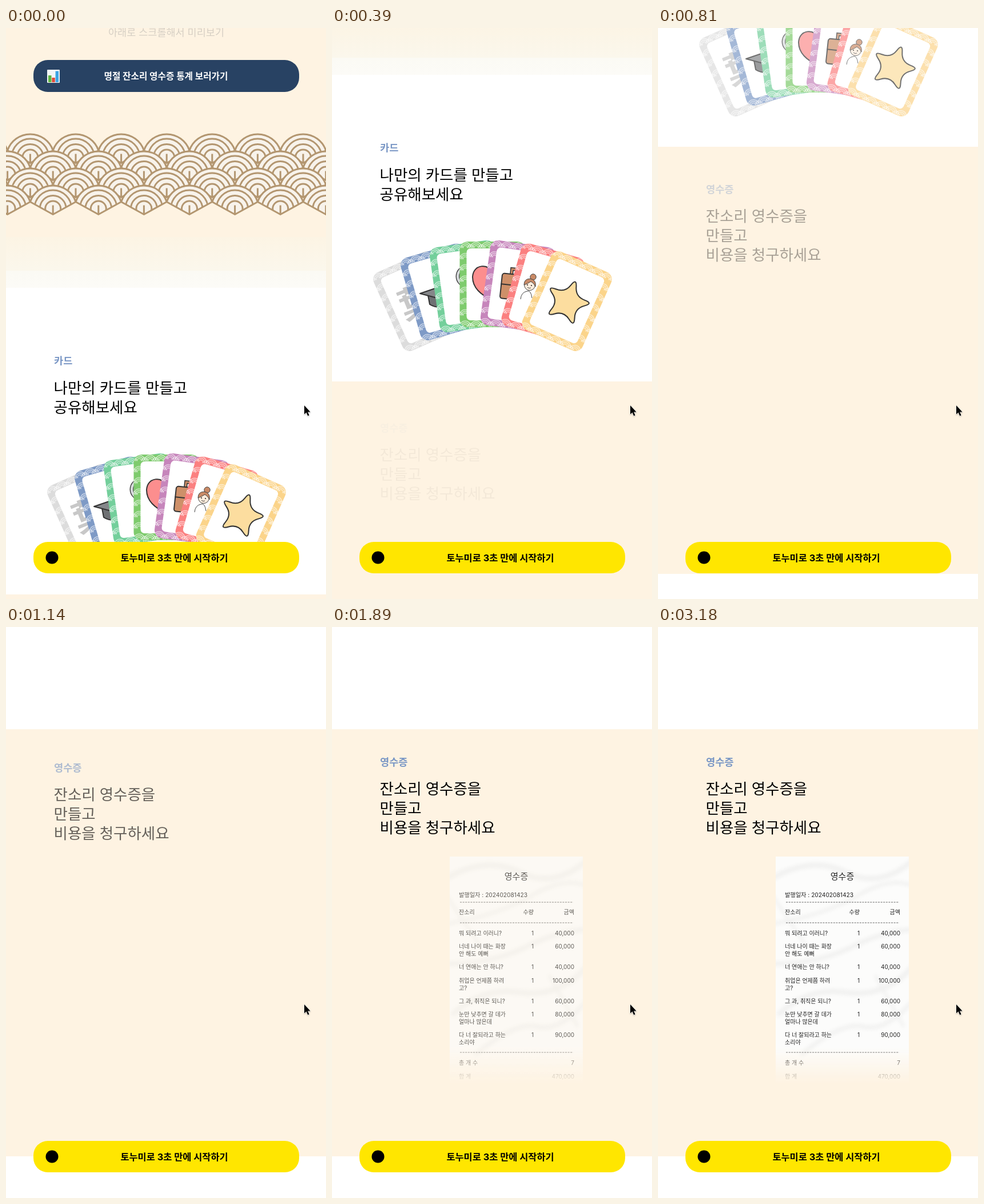
Animation, 560 px wide and 1000 px high, one loop 3.33 s. Source, as an HTML page:

```html
<!DOCTYPE html>
<html lang="ko">
<head>
<meta charset="utf-8">
<title>명절 카드와 영수증</title>
<style>
  html, body { margin: 0; width: 100%; height: 100%; overflow: hidden; background: #fff; }
  svg { display: block; width: 560px; height: 1000px; }
  text { font-family: Inter, "Noto Sans CJK KR", "Noto Sans KR", "Noto Sans CJK JP", sans-serif; white-space: pre; }
  .head { font-size: 26.5px; font-weight: 500; fill: #000; }
  .label { font-size: 17.6px; font-weight: 700; fill: #7a97c5; }
  .row { font-size: 10px; fill: #222; }
  .end { text-anchor: end; }
  .mid { text-anchor: middle; }
</style>
</head>
<body>
<svg id="stage" viewBox="0 0 560 1000" xmlns="http://www.w3.org/2000/svg"></svg>
<script>
const LOOP = 3330, STEP = 30;

// [ms, value] keys, joined by a monotone cubic curve
const SCROLL = [[0, 0], [90, 6], [180, 37], [300, 194], [390, 373], [510, 573], [630, 692],
  [720, 750], [840, 791], [960, 807], [1110, 813]];
const FAN = [[690, 1], [1020, 0]];
const HEADING = [[330, 0], [390, .04], [630, .2], [1140, .6], [1440, .86], [1740, 1]];
const RECEIPT = [[1170, 0], [1890, .72], [2310, 1]];

function curve(keys, t) {
  const last = keys.length - 1;
  if (t <= keys[0][0]) return keys[0][1];
  if (t >= keys[last][0]) return keys[last][1];
  const rate = i => (keys[i + 1][1] - keys[i][1]) / (keys[i + 1][0] - keys[i][0]);
  const slope = i => {
    if (i === 0 || i === last) return 0;
    const a = rate(i - 1), b = rate(i);
    return a * b > 0 ? 2 * a * b / (a + b) : 0;
  };
  let i = 0;
  while (t > keys[i + 1][0]) i++;
  const [t0, v0] = keys[i], [t1, v1] = keys[i + 1];
  const h = t1 - t0, u = (t - t0) / h, w = 1 - u;
  return v0 * (1 + 2 * u) * w * w + slope(i) * h * u * w * w
    + v1 * u * u * (3 - 2 * u) - slope(i + 1) * h * u * u * w;
}

const text = (x, y, str, cls = '', extra = '') => `<text x="${x}" y="${y}" class="${cls}" ${extra}>${str}</text>`;
const rect = (x, y, w, h, fill, rx = 0) =>
  `<rect x="${x}" y="${y}" width="${w}" height="${h}" rx="${rx}" fill="${fill}"/>`;
const range = (n, fn) => Array.from({ length: n }, (_, i) => fn(i)).join('');

// Four overlapping rows of wave scales
function waves() {
  const pitch = 79.6;
  return range(4, row => range(9, i => {
    const x = (row % 2 ? 2.6 : 42.4) + (i - 1) * pitch;
    return `<use href="#scale" x="${x.toFixed(1)}" y="${184.5 + row * 30}"/>`;
  }));
}

function star(cx, cy, outer, inner, turn) {
  const pts = Array.from({ length: 10 }, (_, i) => {
    const a = (turn + i * 36) * Math.PI / 180, r = i % 2 ? inner : outer;
    return [cx + r * Math.cos(a), cy + r * Math.sin(a)];
  });
  const mid = i => {
    const a = pts[i % 10], b = pts[(i + 1) % 10];
    return `${((a[0] + b[0]) / 2).toFixed(1)} ${((a[1] + b[1]) / 2).toFixed(1)}`;
  };
  return `M${mid(9)}` + range(10, i => `Q${pts[i].map(v => v.toFixed(1)).join(' ')} ${mid(i)}`) + 'Z';
}

const ink = 'stroke="#333" stroke-width="2" stroke-linejoin="round" stroke-linecap="round"';
const cards = [
  ['#dcdcdc', `<text transform="translate(149 479) rotate(-22)" y="23" class="mid" font-size="64" font-weight="900" fill="#c8c8c8">葉</text>`],
  ['#7e9ac6', `<path d="M168 468l3 16q9 6 24 5v-22z" fill="#6f7174" ${ink}/>
    <path d="M154 465l38-13 32 8-32 15z" fill="#85878a" ${ink}/>`],
  ['#73cf9b', `<ellipse cx="238" cy="435" rx="18" ry="17" fill="none" stroke="#444" stroke-width="7"/>
    <ellipse cx="238" cy="435" rx="18" ry="17" fill="none" stroke="#d9dcdf" stroke-width="4"/>`],
  ['#7ecb6d', `<path d="M281 428C274 412 247 413 246 436C246 455 261 468 279 475C298 468 315 455 315 436C314 413 288 412 281 428Z" fill="#fc8e8e" ${ink}/>`],
  ['#c685bb', `<g transform="rotate(6 322 452)"><path d="M312 432v-9h22v9" fill="none" stroke="#333" stroke-width="6"/>
    <path d="M312 432v-9h22v9" fill="none" stroke="#c98c66" stroke-width="3"/>
    <rect x="296" y="432" width="54" height="44" rx="4" fill="#ce9069" ${ink}/><path d="M296 451h54m-35-4v8" fill="none" ${ink}/></g>`],
  ['#fb8080', `<g stroke="#444" stroke-width="1"><circle cx="352" cy="436" r="5.2" fill="#c98a66"/>
    <circle cx="346" cy="450" r="9.5" fill="#fdecdc"/>
    <path d="M336 450Q336 439 347 439Q358 441 356 453Q354 447 348 444Q342 448 336 450Z" fill="#c98a66"/>
    <path d="M330 475Q331 463 341 461Q348 458 350 473" fill="#fff"/>
    <path d="M342 454q3 3 6 1" fill="none"/></g>
    <circle cx="342" cy="450" r=".9"/><circle cx="349" cy="451" r=".9"/>`],
  ['#fbd48a', `<path d="${star(412, 480, 46, 17, -69)}" fill="#fcdd9f" ${ink}/>`]
];

function fan() {
  return cards.map(([color, icon], i) => {
    const deg = (i - 3) * 8, a = deg * Math.PI / 180;
    const x = 281 + 320 * Math.sin(a), y = 449 + 340 * (1 - Math.cos(a));
    return `<g transform="translate(${x.toFixed(1)} ${y.toFixed(1)}) rotate(${deg}) translate(-57.5 -75)">
      ${rect(0, 0, 115, 150, color, 14)}${rect(0, 0, 115, 150, 'url(#ripple)', 14)}
      ${rect(12, 12, 91, 126, '#fff', 7)}</g>${icon}`;
  }).join('');
}

const items = [
  [536, ['뭐 되려고 이러니?'], '40,000'],
  [559, ['너네 나이 때는 화장', '안 해도 예뻐'], '60,000'],
  [595, ['너 연애는 안 하니?'], '40,000'],
  [619, ['취업은 언제쯤 하려', '고?'], '100,000'],
  [655, ['그 과, 취직은 되니?'], '60,000'],
  [678, ['눈만 낮추면 갈 데가', '얼마나 많은데'], '80,000'],
  [714, ['다 너 잘되라고 하는', '소리야'], '90,000']
];

function receipt() {
  const cell = (y, a, b, c) => text(222, y + 3.8, a, 'row') + text(353, y + 3.8, b, 'row end') + text(424, y + 3.8, c, 'row end');
  const rule = y => `<path d="M224 ${y}H422" stroke="#666" stroke-dasharray="3 1.6"/>`;
  const creases = `<g filter="url(#soft)" fill="none" stroke="#777" opacity=".08">
    <path d="M200 440Q270 400 330 430T450 405" stroke-width="9"/><path d="M200 520Q290 505 350 470T450 455" stroke-width="6"/>
    <path d="M200 590Q280 590 340 560T450 530" stroke-width="8"/><path d="M210 680Q260 630 330 640T450 590" stroke-width="9"/>
    <path d="M250 750Q320 690 360 700T450 650" stroke-width="7"/><path d="M200 470L260 560M380 610L430 700" stroke-width="5"/></g>`;
  return `<g clip-path="url(#paper)">${rect(206, 402, 233, 400, '#fcfcfb')}${creases}</g>`
    + text(322.5, 441.5, '영수증', 'mid', 'font-size="15" fill="#222"')
    + text(222, 472.6, '발행일자 : 202402081423', 'row', 'style="font-size:10.2px"')
    + rule(482) + cell(499, '잔소리', '수량', '금액') + rule(518)
    + items.map(([y, lines, sum]) => cell(y, lines[0], '1', sum)
      + (lines[1] ? text(222, y + 16.5, lines[1], 'row') : '')).join('')
    + rule(745) + cell(763, '총 개 수', '', '7') + cell(787, '합 계', '', '470,000');
}

const defs = `<defs>
  <clipPath id="body"><path d="M-39.8 31A42 42 0 0 1 39.8 31L0 52Z"/></clipPath>
  <g id="scale"><path d="M-39.8 30A42 42 0 0 1 39.8 30L0 52Z" fill="#f8f3eb"/>
    <g clip-path="url(#body)" fill="none" stroke="#b39670" stroke-width="3">
      <circle cy="42" r="32.5"/><circle cy="42" r="23"/><circle cy="42" r="13.5"/><path d="M0 36V52"/></g>
    <path d="M-39.8 30A42 42 0 0 1 39.8 30L0 52Z" fill="none" stroke="#b39670" stroke-width="3" stroke-linejoin="round"/></g>
  <pattern id="ripple" width="19.17" height="19.71" patternUnits="userSpaceOnUse">
    <g fill="none" stroke="#fff" stroke-width="1" opacity=".85">
      <path d="M0 10.5a9.58 9.58 0 0 1 19.17 0M3 10.5a6.6 6.6 0 0 1 13.2 0M6 10.5a3.6 3.6 0 0 1 7.2 0"/>
      <path d="M0 5.5q4 1 6 6M0 8.5q2.5 1 3 3M19.17 5.5q-4 1-6 6M19.17 8.5q-2.5 1-3 3"/></g>
  </pattern>
  <linearGradient id="fade" x1="0" y1="0" x2="0" y2="1">
    <stop offset="0" stop-color="#fcf4e4"/><stop offset=".66" stop-color="#fbf7ec"/>
    <stop offset=".67" stop-color="#fbfaf4"/><stop offset="1" stop-color="#fcfbf7"/></linearGradient>
  <linearGradient id="tail" gradientUnits="userSpaceOnUse" x1="0" y1="735" x2="0" y2="800">
    <stop stop-color="#fff"/><stop offset="1" stop-color="#000"/></linearGradient>
  <mask id="melt" maskUnits="userSpaceOnUse" x="200" y="400" width="250" height="410">${rect(200, 400, 250, 410, 'url(#tail)')}</mask>
  <clipPath id="paper"><rect x="206" y="402" width="233" height="400"/></clipPath>
  <filter id="soft"><feGaussianBlur stdDeviation="3"/></filter>
  <filter id="drop" x="-50%" y="-50%" width="200%" height="200%"><feDropShadow dx="0" dy="1" stdDeviation="1" flood-opacity=".3"/></filter>
</defs>`;

const page = `<g id="page">
  ${rect(0, -10, 560, 378, '#fef3e2')}
  ${text(280.5, 13.5, '아래로 스크롤해서 미리보기', 'mid', 'font-size="17.5" fill="#d6cfc4"')}
  ${rect(48, 56, 465, 56, '#284263', 25)}
  ${rect(72, 73, 22, 23, '#f3f6f7', 1)}${rect(74, 83, 5.5, 12, '#5fb441')}${rect(80.3, 87, 5.5, 8, '#e14b3c')}${rect(86.6, 75.5, 5.5, 19.5, '#3ca5e4')}
  ${text(280, 90, '명절 잔소리 영수증 통계 보러가기', 'mid', 'font-size="15.7" font-weight="700" fill="#fff"')}
  ${waves()}
  ${rect(0, 366, 560, 89, 'url(#fade)')}
  ${text(84, 589, '카드', 'label')}
  ${text(83.5, 640, '나만의 카드를 만들고', 'head')}${text(83.5, 674, '공유해보세요', 'head')}
  <g id="fan" transform="translate(0 373)">${fan()}</g>
  ${rect(0, 992, 560, 748, '#fef3e2')}
  <g id="heading">${text(84, 1056, '영수증', 'label')}
    ${['잔소리 영수증을', '만들고', '비용을 청구하세요'].map((s, i) => text(83.5, 1106 + i * 34, s, 'head')).join('')}</g>
  <g id="receipt" transform="translate(0 813)"><g mask="url(#melt)">${receipt()}</g></g>
</g>`;

const overlay = rect(48, 900, 465, 55, '#ffe600', 25)
  + '<circle cx="80.5" cy="927.5" r="11"/>'
  + text(294.5, 934, '토누미로 3초 만에 시작하기', 'mid', 'font-size="16.4" font-weight="700"')
  + `<path d="M522 661v15.500l3.500-3.200 2.700 6 2.400-1-2.600-5.800h4.600z" stroke="#fff" stroke-width="1"
      paint-order="stroke" filter="url(#drop)"/>`;

const $ = id => document.getElementById(id);
$('stage').innerHTML = defs + page + overlay;
const view = $('page'), hand = $('fan'), heading = $('heading'), slip = $('receipt');

function draw(ms) {
  const t = Math.floor((ms % LOOP) / STEP) * STEP;
  const shown = curve(HEADING, t);
  view.setAttribute('transform', `translate(0 ${-Math.round(curve(SCROLL, t))})`);
  hand.setAttribute('opacity', curve(FAN, t).toFixed(3));
  heading.setAttribute('transform', `translate(0 ${(25 * (1 - shown)).toFixed(2)})`);
  heading.setAttribute('opacity', shown.toFixed(3));
  slip.setAttribute('opacity', curve(RECEIPT, t).toFixed(3));
}

const start = performance.now();
function tick() {
  draw(performance.now() - start);
  requestAnimationFrame(tick);
}
tick();
</script>
</body>
</html>
```
